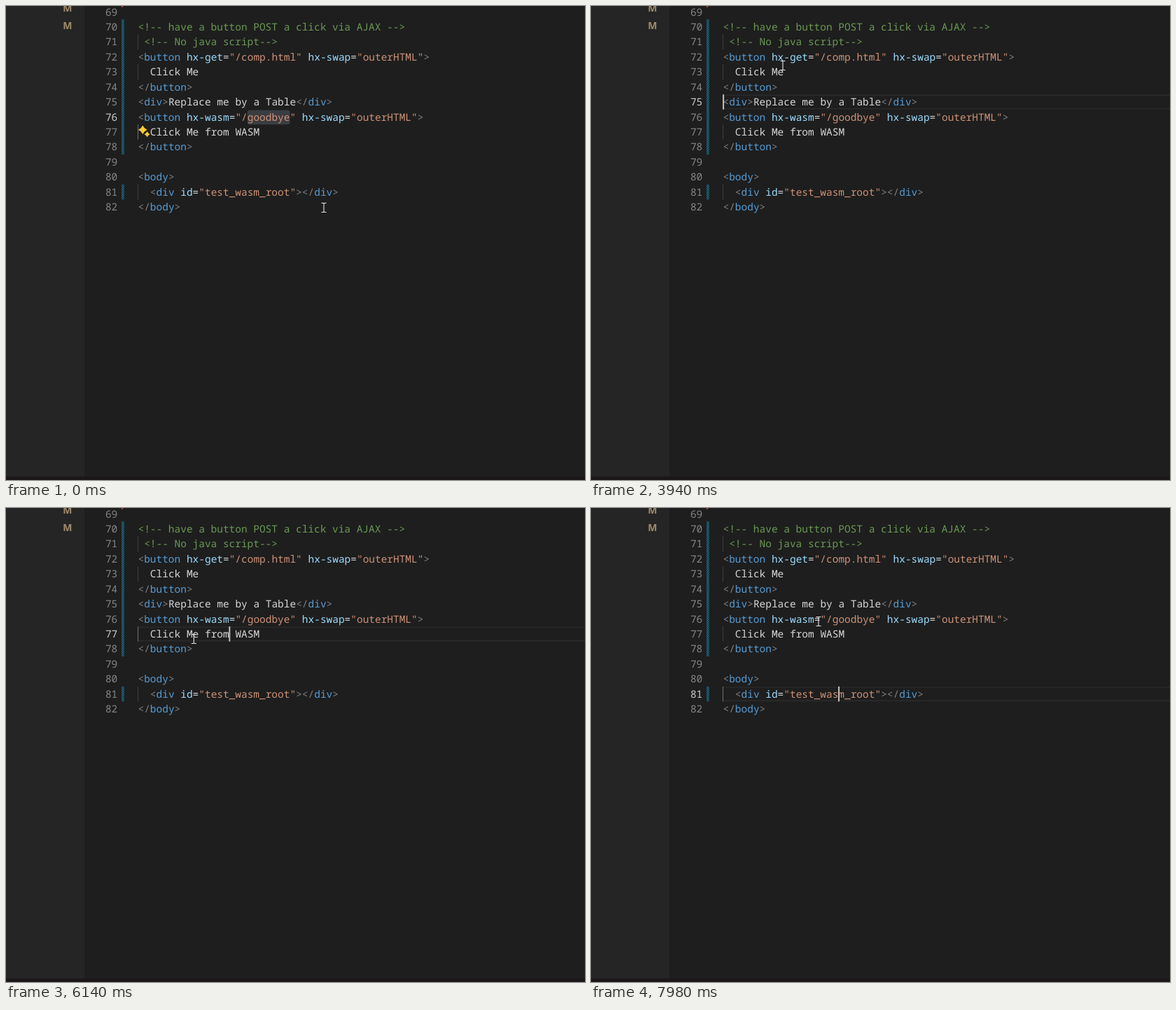
An HTML page that plays this animation: 827 px wide and 677 px high, repeating every 8 s.

```html
<!DOCTYPE html>
<html lang="en">
<head>
<meta charset="utf-8">
<title>Editor</title>
<style>
html, body { margin: 0; width: 100%; height: 100%; overflow: hidden; background: #1e1e1e; }
svg { display: block; width: 827px; height: 677px; }
text { font: 14.46px "Noto Sans Mono", monospace; text-rendering: geometricPrecision; }
.m { font: bold 14px "Open Sans", sans-serif; fill: #a08c6a; }
</style>
</head>
<body>
<svg id="stage" viewBox="0 0 827 677"></svg>
<script>
const X0 = 188.5, CHAR = 8.68, ROW = 21.43, FIRST = 70, LOOP = 8000;
const lines = [
  '<!-- have a button POST a click via AJAX -->',
  ' <!-- No java script-->',
  '<button hx-get="/comp.html" hx-swap="outerHTML">',
  '  Click Me',
  '</button>',
  '<div>Replace me by a Table</div>',
  '<button hx-wasm="/goodbye" hx-swap="outerHTML">',
  '  Click Me from WASM',
  '</button>',
  '',
  '<body>',
  '  <div id="test_wasm_root"></div>',
  '</body>'
];
const color = { comment: '#6a9955', punct: '#808080', tag: '#569cd6', attr: '#9cdcfe',
  string: '#ce9178', plain: '#d8d8d8', num: '#858585', active: '#cccccc' };

const svg = document.getElementById('stage');
const colX = c => X0 + c * CHAR;
const rowY = n => 19.2 + (n - FIRST) * ROW;
const baseline = n => rowY(n) + 15.8;
const clamp = (v, lo, hi) => Math.max(lo, Math.min(hi, v));

function set(el, attrs) {
  for (const k in attrs) el.setAttribute(k, attrs[k]);
}
function add(name, attrs = {}, parent = svg) {
  const el = document.createElementNS('http://www.w3.org/2000/svg', name);
  set(el, attrs);
  return parent.appendChild(el);
}
function label(x, y, text, attrs) {
  const el = add('text', { x, y, ...attrs });
  el.textContent = text;
  return el;
}
const rect = (x, y, width, height, fill, more) => add('rect', { x, y, width, height, fill, ...more });
const show = (el, on) => { el.style.display = on ? '' : 'none'; };

// Splits one line of markup into [column, text, kind].
function tokens(line) {
  if (line.includes('<!--')) return [[line.indexOf('<'), line.trim(), 'comment']];
  const out = [];
  let inTag = false, named = false;
  for (const { 0: s, index } of line.matchAll(/<\/?|>|"[^"]*"|=|[\w-]+/g)) {
    let kind = 'plain';
    if (s[0] === '<') { kind = 'punct'; inTag = true; named = false; }
    else if (s === '>') { kind = 'punct'; inTag = false; }
    else if (s[0] === '"') kind = 'string';
    else if (inTag && s !== '=') { kind = named ? 'attr' : 'tag'; named = true; }
    out.push([index, s, kind]);
  }
  return out;
}

// Backgrounds
rect(0, 0, 827, 677, '#1e1e1e');
rect(0, 0, 112, 677, '#252526');
rect(0, 672, 827, 5, '#1b1719');
for (const y of [8, 32.5]) label(81.3, y, 'M', { class: 'm' });

// Changed-line marks
const hatch = add('pattern', { id: 'hatch', width: 2.33, height: 2.33,
  patternUnits: 'userSpaceOnUse', patternTransform: 'rotate(45)' }, add('defs'));
add('rect', { width: 1.17, height: 2.33, fill: '#1b81a8' }, hatch);
rect(165, rowY(70), 3.8, ROW * 9, 'url(#hatch)');
rect(165, rowY(81), 3.8, ROW, 'url(#hatch)');
add('path', { d: 'M165 0H168L165 2.5Z', fill: '#c74e39' });

// Row frame and selections
const rowFrame = add('path', { fill: 'none', stroke: '#2a2a2a', 'stroke-width': 1.6 });
const word = rect(colX(18), rowY(76) + 1, CHAR * 7, ROW - 1, '#3a3d41', { rx: 3 });
const picked = [76, 77, 78].map(n => ({ n, el: rect(X0, rowY(n), 0, ROW, '#264f78', { rx: 3 }) }));

// Indent guides; those of a block light up with the caret in it
const guides = [71, 73, 77, 81].map(n => ({ n, el: rect(188, rowY(n), 1, ROW, '#404040') }));

// Line numbers and code
const numbers = [];
for (let n = 69; n <= 82; n++) numbers.push({ n, el: label(colX(0) - 46.6, baseline(n), n) });
lines.forEach((line, i) => {
  for (const [c, s, kind] of tokens(line)) label(colX(c), baseline(FIRST + i), s, { fill: color[kind] });
});

// Sparkle, caret, pointer
const star = (x, y, r) => {
  const k = r * 0.27;
  return `M${x} ${y - r}Q${x + k} ${y - k} ${x + r} ${y}Q${x + k} ${y + k} ${x} ${y + r}` +
    `Q${x - k} ${y + k} ${x - r} ${y}Q${x - k} ${y - k} ${x} ${y - r}Z`;
};
const sparkle = add('path', { d: star(6.3, 6.6, 5.7) + star(12.6, 13, 3.4), fill: '#ffcc33',
  stroke: '#ffcc33', 'stroke-linejoin': 'round' });
const caret = rect(0, 0, 2, ROW, '#c0c0be');
const pointer = add('path', { d: 'M-3.5-6.5H-.8L0-5.7L.8-6.5H3.5M-3.5 6.5H-.8L0 5.7L.8 6.5H3.5M0-6V6',
  fill: 'none', stroke: '#e8e8e8', 'stroke-width': 1.1 });

// Bursts of movement: first step, last step, number of steps
const bursts = [
  [440, 1210, 6], [1610, 1890, 3], [2220, 2910, 6], [3210, 4090, 7],
  [4350, 5300, 7], [5450, 6290, 7], [6560, 7550, 8], [7680, 7980, 3]
];
// Pointer path: step, x, y
const path = [
  [0, 454, 288], [2, 457, 314], [6, 425, 241], [9, 401, 126], [11, 422, 108],
  [14, 383.4, 155], [15, 400, 152], [19, 190, 137], [21, 274, 85], [22, 310, 54],
  [24, 381, 95], [25, 350, 114], [29, 375, 122], [30, 345, 126], [34, 285, 241],
  [37, 235, 79], [40, 192.6, 160], [42, 262, 199], [44, 354, 270], [45, 354, 267], [47, 325, 162]
];
const clicks = [11, 14, 19, 25, 32, 40, 45];
const DRAG = 40, DROP = 42;

// Steps taken by time t; steps within a burst are evenly spaced.
function stepAt(t) {
  let total = 0;
  for (const [from, to, count] of bursts) {
    const gap = (to - from) / (count - 1);
    total += clamp(Math.floor((t - from) / gap + 1.1), 0, count);
  }
  return total;
}

function pointerAt(step) {
  const i = Math.max(1, path.findIndex(p => p[0] >= step));
  const [s0, x0, y0] = path[i - 1], [s1, x1, y1] = path[i];
  const u = (step - s0) / (s1 - s0);
  return { x: x0 + (x1 - x0) * u, y: y0 + (y1 - y0) * u };
}

// The caret lands on the nearest column under the pointer.
function caretAt(step) {
  const press = clicks.filter(c => c <= step).pop();
  if (!press) return { row: 76, col: 0 };
  const { x, y } = pointerAt(press === DRAG ? Math.min(step, DROP) : press);
  const i = clamp(Math.floor((y - rowY(FIRST)) / ROW), 0, lines.length - 1);
  return { row: FIRST + i, col: clamp(Math.round((x - X0) / CHAR), 0, lines[i].length) };
}

function draw(t) {
  const step = stepAt(t);
  const { x, y } = pointerAt(step);
  const { row, col } = caretAt(step);
  const focused = step >= clicks[0];
  const selecting = step > DRAG && step < clicks[clicks.length - 1];

  set(pointer, { transform: `translate(${x} ${y})` });
  set(caret, { x: colX(col) - 0.4, y: rowY(row) });
  show(caret, focused);
  show(word, !focused);

  const hint = step >= 28 && step < 32;
  show(sparkle, hint || !focused);
  set(sparkle, { transform: hint ? `translate(115 ${rowY(71) + 1})` : `translate(189 ${rowY(77) + 1})` });

  set(rowFrame, { d: `M${X0} ${rowY(row) + 1}H827M${X0} ${rowY(row) + ROW - 1}H827` });
  show(rowFrame, focused && !selecting);
  for (const { n, el } of picked) {
    show(el, selecting && n <= row);
    set(el, { width: CHAR * (n === row ? col : lines[n - FIRST].length + 1) });
  }
  for (const { n, el } of guides) {
    const lit = n > 71 && Math.abs(n - row) <= 1;
    set(el, { fill: lit ? '#707070' : '#404040' });
  }
  for (const { n, el } of numbers) set(el, { fill: n === row ? color.active : color.num });
}

const start = performance.now();
function tick() {
  draw((performance.now() - start) % LOOP);
  requestAnimationFrame(tick);
}
tick();
</script>
</body>
</html>
```
